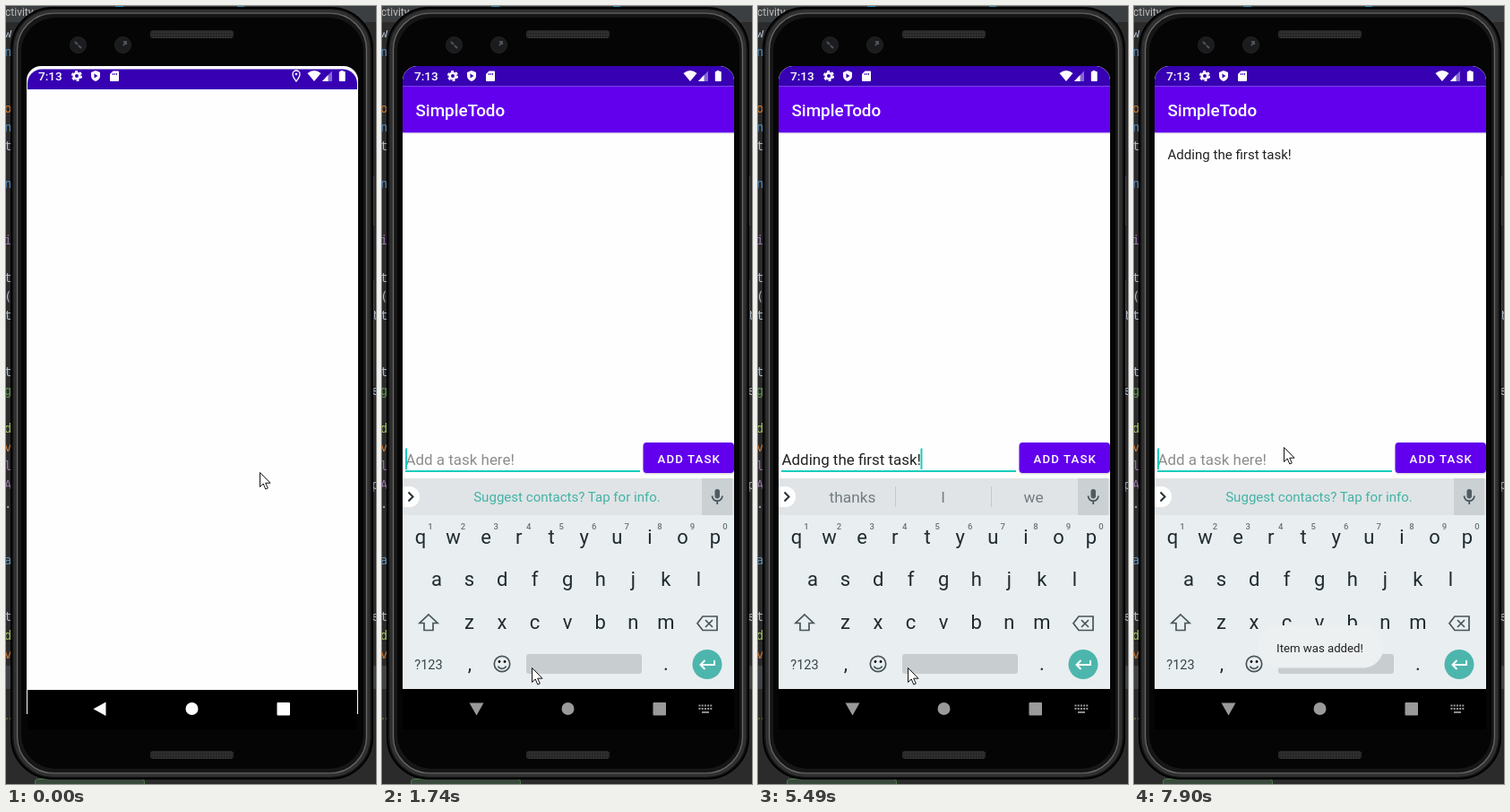
Write an HTML page that moves like this. It is 413 px wide and 868 px high and loops after 8 s.

```html
<!DOCTYPE html>
<html lang="en">
<head>
<meta charset="utf-8">
<title>Todo app on a phone</title>
<style>
html, body { margin: 0; width: 100%; height: 100%; overflow: hidden; background: #2b2b2b; }
svg { display: block; width: 413px; height: 868px; font-family: Roboto, sans-serif; }
.mid { text-anchor: middle; }
.medium { font-weight: 500; }
.code { font: 14px "DejaVu Sans Mono", monospace; }
.line { fill: none; stroke: #47545a; stroke-width: 1.7; }
</style>
</head>
<body>
<svg viewBox="0 0 413 868">
  <defs>
    <clipPath id="screen"><path d="M23 807V83a16 16 0 0 1 16-16H377a16 16 0 0 1 16 16V807Z"/></clipPath>
    <clipPath id="panel"><path d="M23 527H393V762H23Z"/></clipPath>
    <clipPath id="buttonShape"><rect x="291.5" y="487" width="101.5" height="34" rx="4"/></clipPath>
    <pattern id="mesh" width="3" height="3" patternUnits="userSpaceOnUse">
      <path d="M0 0H3V3H0Z" fill="#303030"/><path d="M0 0h1.5v1.5H0Z" fill="#1b1b1b"/>
    </pattern>
  </defs>

  <path d="M0 0H413V18H0Z" fill="#3c3f41"/>
  <path d="M0 736H413V762H0Z" fill="#414446"/>
  <text x="-1" y="11" font-size="12" fill="#bbb">ctivity</text>
  <path d="M122 0h9v2h-9ZM258 0h8v2h-8Z" fill="#3592c4"/>
  <g id="code" class="code"></g>
  <path d="M0 795h7" stroke="#9a8a3c" stroke-dasharray="2"/>
  <rect x="32.5" y="862.5" width="122" height="12" rx="3" fill="#3a4a3c" stroke="#4f7d4a"/>

  <!-- phone body -->
  <path d="M410 190v55M410 306v118" stroke="#4a4a4a" stroke-width="2"/>
  <rect x="6" y="2" width="403" height="860" rx="46" fill="#161616" stroke="#000" stroke-width="2"/>
  <rect x="11" y="6.5" width="393" height="851" rx="42" fill="none" stroke="#303030" stroke-width="5"/>
  <rect x="12.5" y="8" width="390" height="848" rx="41" fill="none" stroke="#686868" stroke-width="1.2"/>
  <rect x="17" y="13" width="382" height="838" rx="38" fill="#050505"/>
  <g fill="url(#mesh)">
    <rect x="161" y="27" width="93" height="9" rx="3"/>
    <rect x="161" y="831" width="93" height="9" rx="3"/>
  </g>
  <g fill="#1b1c1e" stroke="#242528">
    <circle cx="80.500" cy="43.500" r="9"/><circle cx="130.500" cy="43.500" r="9"/>
    <path d="M77 40l3 3m1 1l3 3M134 40l-3 4m0-4h3v3" stroke="#50545a" stroke-width="2"/>
  </g>

  <g clip-path="url(#screen)">
    <path d="M23 67H393V790H23Z" fill="#fefefe"/>
    <path id="statusBar" d="M23 89.500V83a16 16 0 0 1 16-16H377a16 16 0 0 1 16 16V89.500Z" fill="#3700b3"/>
    <g fill="#fff">
      <text x="36" y="83" font-size="13.600" class="medium">7:13</text>
      <circle cx="79" cy="78" r="3.300" fill="none" stroke="#fff" stroke-width="2.600"/>
      <circle cx="79" cy="78" r="5.200" fill="none" stroke="#fff" stroke-width="1.800" stroke-dasharray="3 2.445"/>
      <path d="M100 72l5 2v4q0 4-5 6q-5-2-5-6v-4Z"/>
      <path d="M98.500 75.500l4 2.500-4 2.500Z" fill="#3700b3"/>
      <path d="M119.500 72.500h5.500q1 0 1 1v9.500q0 1-1 1h-8q-1 0-1-1v-7Z"/>
      <path d="M119.500 75v2m2-2v2m2-2v2" stroke="#3700b3"/>
      <g id="pin"><path d="M324 84q-4-5-4-8a4 4 0 0 1 8 0q0 3-4 8Z" fill="none" stroke="#fff" stroke-width="1.300"/><circle cx="324" cy="76" r="1.300"/></g>
      <path d="M336.500 75q7.500-6 15 0L344 84Z"/>
      <path d="M364 72.500V84H353Z" opacity=".4"/><path d="M359.500 77V84H353Z"/>
      <path d="M373.500 73v-1h3v1h1.500q.7 0 .7.700V83.300q0 .7-.7.700h-5.500q-.7 0-.7-.7V73.700q0-.7.700-.7Z"/>
    </g>

    <g id="app">
      <path d="M23 89.500H393V141.500H23Z" fill="#6200ee"/>
      <path d="M23 142H393" stroke="#ddd"/>
      <text x="37.500" y="123" font-size="18.840" class="medium" fill="#fff">SimpleTodo</text>
      <text id="item" x="37.500" y="170.700" font-size="15.070" fill="#222">Adding the first task!</text>
      <g id="row">
        <text id="field" x="26.500" y="512" font-size="16.960"></text>
        <path d="M26 519H288" stroke="#18cdbb" stroke-width="2"/>
        <path id="caret" d="M0 493.500V517" stroke="#18cdbb" stroke-width="2"/>
        <rect x="291.500" y="488.500" width="101.500" height="34" rx="4" fill="#ccc" opacity=".7"/>
        <g clip-path="url(#buttonShape)">
          <path d="M291 487H393V521H291Z" fill="#6200ee"/>
          <circle id="ripple" cx="344" cy="505" fill="#fff"/>
        </g>
        <text x="342.800" y="509.500" font-size="13.190" letter-spacing="1.180" class="mid medium" fill="#fff">ADD TASK</text>
      </g>
    </g>

    <g clip-path="url(#panel)"><g id="keyboard">
      <path d="M23 527H393V762H23Z" fill="#e9eef0"/>
      <path d="M23 527H393V568H23Z" fill="#e0e4e6"/>
      <path d="M357 527H391V568H357Z" fill="#cbd0d2"/>
      <path d="M23 536h7.500a11.500 11.500 0 0 1 0 23H23Z" fill="#fff"/>
      <path d="M29.500 542.500l5 5-5 5" fill="none" stroke="#263238" stroke-width="2"/>
      <rect x="371.500" y="539" width="5.500" height="10.500" rx="2.700" fill="#505c61"/>
      <path d="M368.500 546.500a5.700 5.700 0 0 0 11.400 0M374.200 552.500v3.500" class="line"/>
      <text id="contacts" x="206.500" y="553" font-size="15.070" class="mid" fill="#43b3a5">Suggest contacts? Tap for info.</text>
      <g id="words" class="mid" font-size="17.300" fill="#727d82">
        <path d="M153.500 536v23M260.500 536v23" stroke="#c3c9cc"/>
        <text x="105.500" y="554"></text><text x="206.500" y="554"></text><text x="307.500" y="554"></text>
      </g>
      <g id="keys" class="mid" font-size="22" fill="#1f2b30"></g>
      <path d="M52 679l10 9.500h-5v8H47v-8h-5Z" class="line"/>
      <path d="M358 681h16v15.500H358l-6-7.750ZM361 685l8 8m0-8l-8 8" class="line"/>
      <text x="52" y="739.500" font-size="14.500" class="mid" fill="#37464c">?123</text>
      <circle cx="134" cy="734" r="8.700" class="line"/>
      <path d="M129.500 736.500a5 5 0 0 0 9 0" class="line"/>
      <circle cx="131" cy="731.500" r="1.400"/><circle cx="137" cy="731.500" r="1.400"/>
      <rect x="161" y="723" width="129" height="22" rx="3" fill="#c8cdd0"/>
      <circle cx="363" cy="734.500" r="16.500" fill="#4db6ac"/>
      <path d="M371 730v5H355.500m5-5l-5 5 5 5" fill="none" stroke="#fff" stroke-width="2"/>
    </g></g>

    <path id="nav" fill="#000"/>
    <g id="navIcons">
      <path id="back"/>
      <circle cx="207.500" cy="784" r="7"/>
      <rect x="302.500" y="777" width="14.500" height="14.500" rx="1"/>
      <g id="switcher" fill="none" stroke="#9a9a9a" stroke-width="1.800">
        <path d="M353.500 780.500h15M353.500 784h15" stroke-dasharray="2 1.200"/><path d="M357 788h8"/>
      </g>
    </g>

    <g id="toast">
      <rect x="139" y="691" width="139.500" height="47.500" rx="23" fill="#edf0f1"/>
      <text x="207.500" y="721" font-size="13.190" class="mid" fill="#222">Item was added!</text>
    </g>
  </g>

  <path id="mouse" d="M0 0V16l3.700-3.500 2.600 6 2.500-1.100-2.600-5.700h5.300Z" fill="#fff" stroke="#111"/>
</svg>

<script>
const $ = id => document.getElementById(id);
const set = (id, attrs) => { for (const k in attrs) $(id).setAttribute(k, attrs[k]); };
const show = (id, on) => set(id, { opacity: +on });
const ramp = (t, a, b) => Math.min(1, Math.max(0, (t - a) / (b - a)));
const ease = x => x * x * (3 - 2 * x);
const label = (s, x, y, more = "") => `<text x="${x}" y="${y}" ${more}>${s}</text>`;

// Editor text peeking out beside the phone: one character per 21px line, blanks skipped
const inks = { o: "#cc7832", v: "#cc7832", n: "#5692c8", i: "#9876aa", l: "#9876aa", A: "#9876aa", g: "#629755", d: "#a5c261", a: "#6897bb" };
const column = (chars, x) => [...chars].map((c, i) =>
  c === " " ? "" : label(c, x, 35 + i * 21, `fill="${inks[c] || "#a9b7c6"}"`)).join("");
$("code").innerHTML = column("wn  ont n  i t(t  tg dvlA.  a  tdv", -2) +
  column("               t   e    p      e", 408);

const keyRow = (chars, x, y) => [...chars].map((c, i) => label(c, x + i * 36.55, y)).join("");
$("keys").innerHTML = keyRow("qwertyuiop", 43, 600) + keyRow("asdfghjkl", 61, 647) +
  keyRow("zxcvbnm", 97.5, 694.5) + label(",", 98, 741) + label(".", 317, 741) +
  [..."1234567890"].map((c, i) => label(c, 54 + i * 36.55, 584, 'font-size="9.5" font-weight="500" fill="#66757c"')).join("");

// [time, field text, suggestions]
const typing = [
  [0, ""], [1500, ""], [2420, "A"],
  [2730, "Ad", "and|Ad|add"], [2880, "Addi", "Addie|Addi|adding"],
  [3030, "Addin", "adding|Addin|Add in"], [3180, "Adding ", "a|the|to"],
  [3710, "Adding t", "to|the|this"], [3810, "Adding th", "this|the|that"],
  [3910, "Adding the", "them|the|then"], [4010, "Adding the ", "more|new|things"],
  [4160, "Adding the f", "first|for|few"], [4340, "Adding the fi", "final|first|five"],
  [4520, "Adding the first", "fist|first|firsts"], [4700, "Adding the first ", "one|time|two"],
  [4850, "Adding the first t", "to|time|two"], [4970, "Adding the first ta", "tab|task|talk"],
  [5120, "Adding the first task", "tasks|task|ask"], [5490, "Adding the first task!", "thanks|I|we"],
  [6640, ""]
];

// [time, x, y]
const path = [[150, 283.5, 520.5], [1080, 167.5, 738.5], [5890, 167.5, 738.5], [6400, 345, 505],
  [6640, 345, 505], [7400, 167.5, 492.5], [8000, 167.5, 492.5]];

function mouseAt(t) {
  const i = Math.max(1, path.findIndex(p => p[0] > t));
  const [a, b] = [path[i - 1], path[i]], k = ease(ramp(t, a[0], b[0]));
  return [a[1] + (b[1] - a[1]) * k, a[2] + (b[2] - a[2]) * k];
}

function draw(t) {
  const opening = t < 150, focused = t >= 1380;
  set("statusBar", { transform: opening ? "translate(1.1 3.5) scale(.9946 1)" : "" });
  show("pin", t < 1080);
  show("app", t >= 420);
  show("item", t >= 6640);
  set("row", { transform: `translate(0 ${focused ? 0 : 235})` });

  const [since, text, words] = typing.findLast(e => e[0] <= t);
  $("field").textContent = text.replace(/ /g, "\u00a0");
  const caretX = 27 + (text ? $("field").getComputedTextLength() : 0);
  if (!text) $("field").textContent = "Add a task here!";
  set("field", { fill: text ? "#222" : "#8c8c8c" });
  set("caret", { transform: `translate(${caretX} 0)` });
  show("caret", Math.floor((t - since) / 510) % 2 === 0);

  const shown = words || (t >= 6640 && t < 6790 ? "thanks|I|we" : "");
  show("contacts", !shown);
  show("words", !!shown);
  const slots = $("words").querySelectorAll("text");
  shown.split("|").forEach((w, i) => slots[i].textContent = w);

  set("ripple", { r: 40 * ramp(t, 6400, 6520) + 50 * ramp(t, 6640, 6800), opacity: .2 * (1 - ramp(t, 6640, 6850)) });
  set("keyboard", { transform: `translate(0 ${235 * (1 - ease(ramp(t, 1600, 1740)))})` });

  set("nav", { d: opening ? "M24 763H392V807H24Z" : "M23 762H393V807H23Z" });
  set("navIcons", { fill: focused ? "#9a9a9a" : "#fff" });
  set("back", { d: focused ? "M97.5 777.5H113.500L105.500 791.500Z" : "M111.500 776.500V792L97.500 784.200Z" });
  show("switcher", focused);

  set("toast", { opacity: ramp(t, 6900, 7080) });
  set("mouse", { transform: `translate(${mouseAt(t)})` });
}

const start = performance.now();
(function loop() {
  draw((performance.now() - start) % 8000);
  requestAnimationFrame(loop);
})();
</script>
</body>
</html>
```
